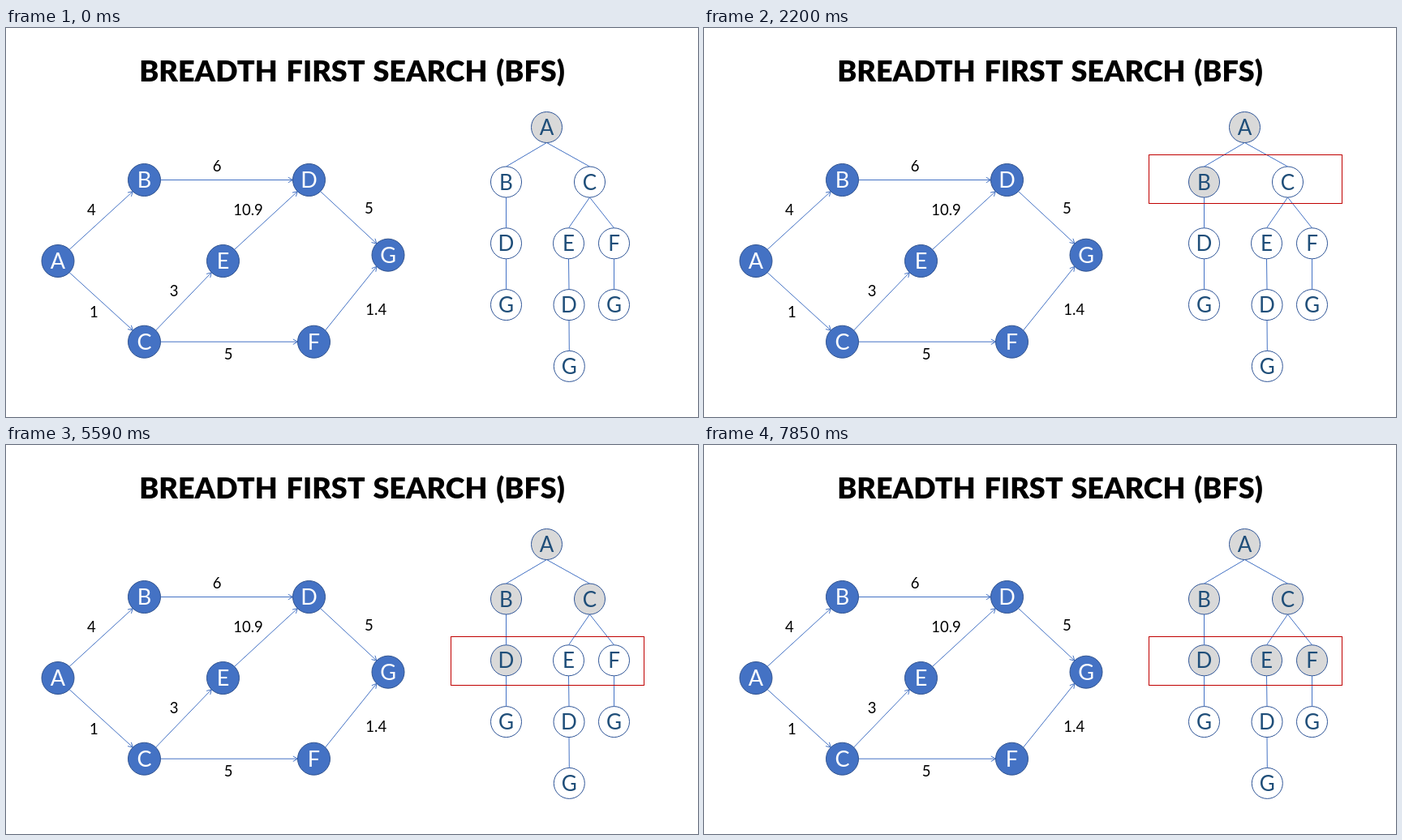
Recreate the animation shown at these times as an HTML page. Size 853x480 px, loop 8000 ms.

```html
<!DOCTYPE html>
<html lang="en">
<head>
<meta charset="utf-8">
<title>Breadth First Search</title>
<style>
  html, body { margin: 0; width: 100%; height: 100%; overflow: hidden; background: #fff; }
  svg { display: block; width: 853px; height: 480px; font-family: Lato, "Open Sans", sans-serif; }
  text { text-anchor: middle; }
  .title { font-size: 36px; font-weight: 900; word-spacing: 2.5px; }
  .weight { font-size: 18.5px; }
  .edge { fill: none; stroke: #4472c4; }
  .node circle { fill: #4472c4; stroke: #2f528f; }
  .node text { fill: #fff; font-size: 27px; }
  .leaf circle { fill: #fff; stroke: #2f5597; }
  .leaf.visited circle { fill: #d9d9d9; }
  .leaf text { fill: #1f4e79; font-size: 26px; }
  .level { fill: none; stroke: #c00000; }
</style>
</head>
<body>
<svg id="stage" viewBox="0 0 853 480">
  <text class="title" x="426.5" y="65.5">BREADTH FIRST SEARCH (BFS)</text>
</svg>
<script>
const NODE_R = 20, LEAF_R = 19;
const LOOP = 8000, FIRST_STEP = 1070, STEP = 1130;
const stage = document.getElementById('stage');

function add(parent, tag, attrs, content = '') {
  const el = document.createElementNS('http://www.w3.org/2000/svg', tag);
  for (const key in attrs) el.setAttribute(key, attrs[key]);
  el.textContent = content;
  return parent.appendChild(el);
}

function addNode(kind, r, letter, x, y) {
  const group = add(stage, 'g', { class: kind });
  add(group, 'circle', { cx: x, cy: y, r });
  add(group, 'text', { x, y: y + 9.5 }, letter);
  return group;
}

// Arrows leave and enter a circle at its side or at a 45° corner.
function addArrow(from, to) {
  const sx = Math.sign(to.x - from.x), sy = Math.sign(to.y - from.y);
  const reach = NODE_R / Math.hypot(sx, sy);
  const x1 = from.x + sx * reach, y1 = from.y + sy * reach;
  const x2 = to.x - sx * reach, y2 = to.y - sy * reach;
  const angle = Math.atan2(y2 - y1, x2 - x1);
  const barb = turn => `${x2 - 6.5 * Math.cos(angle + turn)} ${y2 - 6.5 * Math.sin(angle + turn)}`;
  add(stage, 'path', {
    class: 'edge',
    d: `M${x1} ${y1}L${x2} ${y2}M${barb(0.52)}L${x2} ${y2}L${barb(-0.52)}`
  });
}

function drawGraph() {
  const top = 187.5, middle = 287.5, bottom = 387.2;
  const nodes = {
    A: { x: 64, y: middle }, B: { x: 170.5, y: top }, C: { x: 170.5, y: bottom },
    D: { x: 373.5, y: top }, E: { x: 267.5, y: middle }, F: { x: 379.5, y: bottom },
    G: { x: 471, y: 280.2 }
  };
  // Ends, weight, and the weight's offset from the middle of the edge
  const edges = [
    ['AB', '4', -12, -13], ['AC', '1', -9, 13], ['BD', '6', -12, -17], ['CE', '3', -12, -13],
    ['ED', '10.9', -22, -13], ['CF', '5', -1, 15], ['DG', '5', 25, -11], ['FG', '1.4', 31, 14]
  ];
  for (const [[start, end], weight, dx, dy] of edges) {
    const from = nodes[start], to = nodes[end];
    addArrow(from, to);
    const x = (from.x + to.x) / 2 + dx, y = (from.y + to.y) / 2 + dy + 6.5;
    add(stage, 'text', { class: 'weight', x, y }, weight);
  }
  for (const letter in nodes) addNode('node', NODE_R, letter, nodes[letter].x, nodes[letter].y);
}

// Nested as [letter, x, ...children]; returns the leaves row by row.
function drawTree(root) {
  const rows = [];
  function place([letter, x, ...children], depth) {
    const y = depth ? 190 + 75.8 * (depth - 1) : 122.5;
    for (const child of children) {
      const end = place(child, depth + 1);
      add(stage, 'path', { class: 'edge', d: `M${x} ${y + LEAF_R}L${end.x} ${end.y - LEAF_R}` });
    }
    (rows[depth] ||= []).push(addNode('leaf', LEAF_R, letter, x, y));
    return { x, y };
  }
  place(root, 0);
  return rows;
}

drawGraph();
const rows = drawTree(
  ['A', 666.5,
    ['B', 616.5, ['D', 616.5, ['G', 616.5]]],
    ['C', 719.5,
      ['E', 693.5, ['D', 694, ['G', 694.3]]],
      ['F', 749.5, ['G', 749.5]]]]);
const level = add(stage, 'rect', { class: 'level', x: 548.5, width: 238, height: 60 });

// Each row is framed first, then its leaves are visited one by one.
const steps = [];
const order = rows.flat();
let visited = 0;
rows.forEach((row, depth) => {
  if (depth) steps.push({ depth, visited });
  for (const leaf of row) steps.push({ depth, visited: ++visited });
});

function draw() {
  const time = performance.now() % LOOP;
  const { depth, visited } = steps[Math.max(0, Math.floor((time - FIRST_STEP) / STEP) + 1)];
  order.forEach((leaf, i) => leaf.classList.toggle('visited', i < visited));
  level.setAttribute('visibility', depth ? 'visible' : 'hidden');
  level.setAttribute('y', 76.5 + 80 * depth);
  requestAnimationFrame(draw);
}
draw();
</script>
</body>
</html>
```
